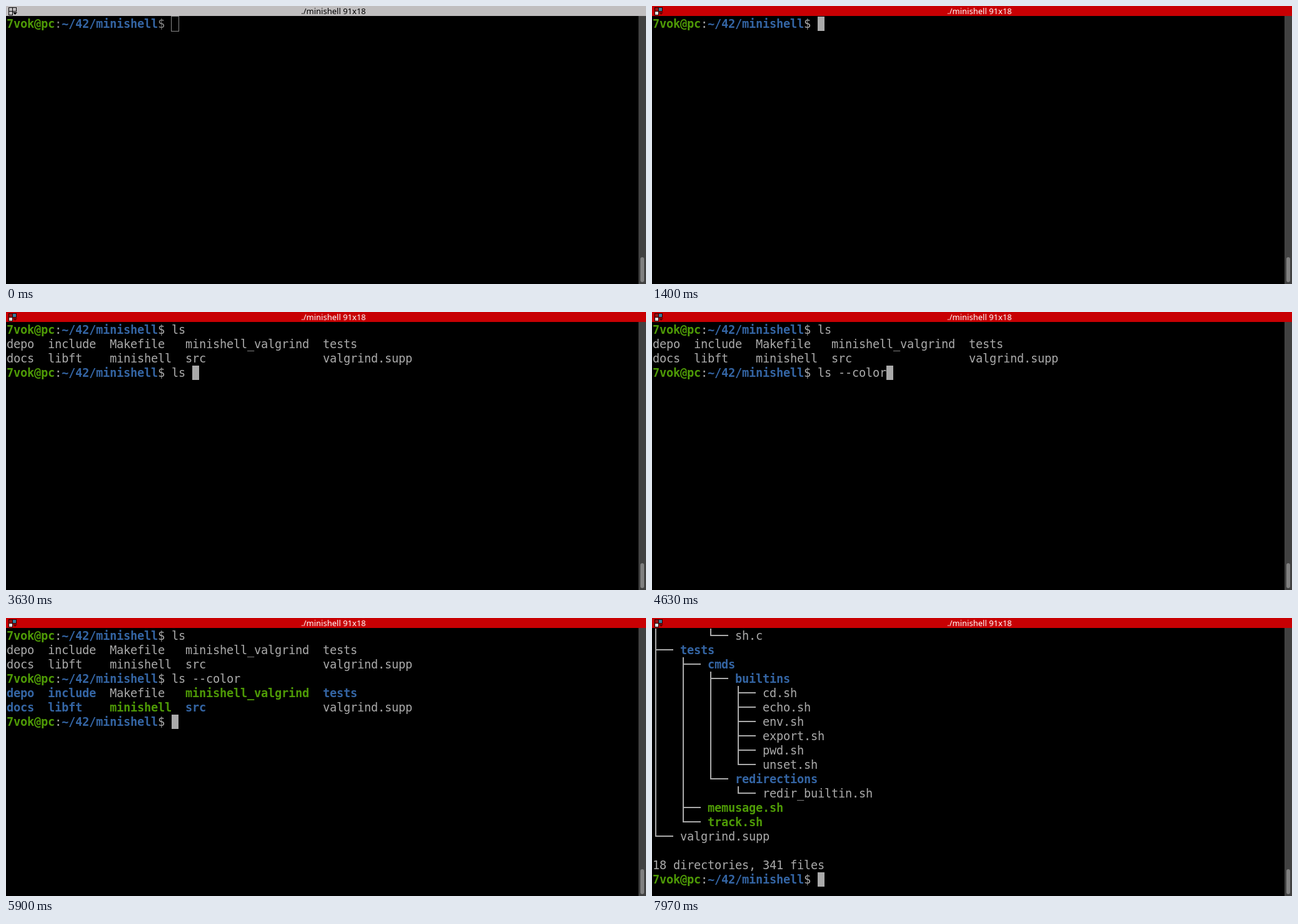
Recreate the animation shown at these times as an HTML page with a canvas. Size 1024x446 px, loop 8 s.

```html
<!DOCTYPE html>
<html lang="en">
<head>
<meta charset="utf-8">
<title>minishell</title>
<style>
  html, body { margin: 0; width: 100%; height: 100%; overflow: hidden; background: #000; }
  canvas { display: block; }
</style>
</head>
<body>
<canvas id="stage" width="1024" height="446"></canvas>
<script>
const ctx = document.getElementById('stage').getContext('2d');
const LOOP = 8000, FOCUS = 30, BLINK = 600, ECHO_DELAY = 40;
const CELL = { w: 11, h: 23, x: 1, y: 17, ascent: 18 };
const FONT = '18.667px "DejaVu Sans Mono", monospace';
const COLOR = {
  text: '#aaaaaa', dim: '#888888', green: '#4e9a06', blue: '#3465a4',
  line: '#aaaaaa', cursor: '#aaaaaa', hollow: '#888888'
};

// Key presses as [time, key]; Enter prints the next output.
const type = (text, times) => [...text].map((key, i) => [times[i], key]);
const keys = [
  ...type('ls\n', [1430, 1530, 1730]),
  ...type('ls --', [3400, 3500, 3600, 3700, 3770]),
  ...type('color\n', [4130, 4230, 4330, 4430, 4530, 5330]),
  ...type('tree\n', [7100, 7230, 7350, 7470, 7930])
];

// Listing entries: [column, name, kind]
const listing = [
  [[0, 'depo', 'blue'], [6, 'include', 'blue'], [15, 'Makefile', 'text'],
   [26, 'minishell_valgrind', 'green'], [46, 'tests', 'blue']],
  [[0, 'docs', 'blue'], [6, 'libft', 'blue'], [15, 'minishell', 'green'],
   [26, 'src', 'blue'], [46, 'valgrind.supp', 'text']]
];

// Tree entries: [branch, name, kind]
const tree = [
  ['│       └── ', 'sh.c'],
  ['├── ', 'tests', 'blue'],
  ['│   ├── ', 'cmds', 'blue'],
  ['│   │   ├── ', 'builtins', 'blue'],
  ...['cd', 'echo', 'env', 'export', 'pwd', 'unset'].map((name, i) =>
    ['│   │   │   ' + (i < 5 ? '├── ' : '└── '), name + '.sh']),
  ['│   │   └── ', 'redirections', 'blue'],
  ['│   │       └── ', 'redir_builtin.sh'],
  ['│   ├── ', 'memusage.sh', 'green'],
  ['│   └── ', 'track.sh', 'green'],
  ['└── ', 'valgrind.supp'],
  ['', ''],
  ['', '18 directories, 341 files']
];

function rect(x, y, w, h, color) {
  ctx.fillStyle = color;
  ctx.fillRect(x, y, w, h);
}

function put(row, col, text, kind = 'text') {
  const bold = kind === 'green' || kind === 'blue';
  ctx.font = (bold ? 'bold ' : '') + FONT;
  ctx.textAlign = 'left';
  ctx.fillStyle = COLOR[kind];
  [...text].forEach((ch, i) =>
    ctx.fillText(ch, CELL.x + (col + i) * CELL.w, CELL.y + row * CELL.h + CELL.ascent));
}

function branch(row, text) {
  const y = CELL.y + row * CELL.h;
  [...text].forEach((ch, i) => {
    const x = CELL.x + i * CELL.w;
    if ('│├└'.includes(ch)) rect(x + 4, y, 2, ch === '└' ? 12 : CELL.h, COLOR.line);
    if ('├└'.includes(ch)) rect(x + 4, y + 10, 7, 2, COLOR.line);
    if (ch === '─') rect(x, y + 10, CELL.w, 2, COLOR.line);
  });
}

function prompt(row, command, focused) {
  const plain = focused ? 'text' : 'dim';
  put(row, 0, '7vok@pc', 'green');
  put(row, 7, ':', plain);
  put(row, 8, '~/42/minishell', 'blue');
  put(row, 22, '$', plain);
  put(row, 24, command);
}

function printListing(row, colored) {
  listing.forEach((entries, i) => entries.forEach(([col, name, kind]) =>
    put(row + i, col, name, colored ? kind : 'text')));
}

function printTree() {
  tree.forEach(([lines, name, kind], row) => {
    branch(row, lines);
    put(row, lines.length, name, kind);
  });
}

function cursor(row, col, t) {
  const x = CELL.x + col * CELL.w, y = CELL.y + row * CELL.h;
  if (t < FOCUS) {
    ctx.strokeStyle = COLOR.hollow;
    ctx.lineWidth = 1;
    ctx.strokeRect(x - .5, y - .5, CELL.w + 1, CELL.h + 1);
    return;
  }
  const reset = keys.reduce((last, [time]) => time <= t ? time : last, FOCUS);
  if (Math.floor((t - reset) / BLINK) % 2 === 0) rect(x, y, CELL.w, CELL.h, COLOR.cursor);
}

function icon(focused) {
  const tiles = focused ? ['#a01010', '#3a7f9e', '#dddddd'] : ['#c0bebf', '#c0bebf', '#c0bebf'];
  const dark = focused ? '#200000' : '#000';
  [[4, 2], [10, 2], [4, 8]].forEach(([x, y], i) => {
    rect(x, y, 7, 7, dark);
    rect(x + 1, y + 1, 5, 5, tiles[i]);
  });
  ctx.fillStyle = focused ? '#600000' : '#000';
  ctx.beginPath();
  ctx.moveTo(11, 10);
  ctx.lineTo(18, 10);
  ctx.lineTo(14.5, 14);
  ctx.fill();
}

function chrome(focused) {
  rect(0, 0, 1024, 16, focused ? '#c80003' : '#c0bebf');
  icon(focused);
  ctx.font = '13px "Noto Sans", sans-serif';
  ctx.textAlign = 'center';
  ctx.fillStyle = focused ? '#fff' : '#000';
  ctx.fillText('./minishell 91x18', 524, 13);
  rect(1012, 16, 12, 430, '#414141');
  ctx.fillStyle = '#808080';
  ctx.beginPath();
  ctx.roundRect(1015, 403, 6, 40, 3);
  ctx.fill();
}

function render(t) {
  const commands = [''];
  for (const [time, key] of keys) {
    if (key === '\n') {
      if (time + ECHO_DELAY <= t) commands.push('');
    } else if (time <= t) {
      commands[commands.length - 1] += key;
    }
  }
  const focused = t >= FOCUS;
  rect(0, 0, 1024, 446, '#000');
  chrome(focused);

  const done = commands.length - 1, command = commands[done];
  let row = done * 3;
  if (done === 3) {
    printTree();
    row = tree.length;
  } else {
    for (let i = 0; i < done; i++) {
      prompt(i * 3, commands[i], true);
      printListing(i * 3 + 1, i === 1);
    }
  }
  prompt(row, command, focused);
  cursor(row, 24 + command.length, t);
}

const start = performance.now();
function tick() {
  render((performance.now() - start) % LOOP);
  requestAnimationFrame(tick);
}
tick();
</script>
</body>
</html>
```
